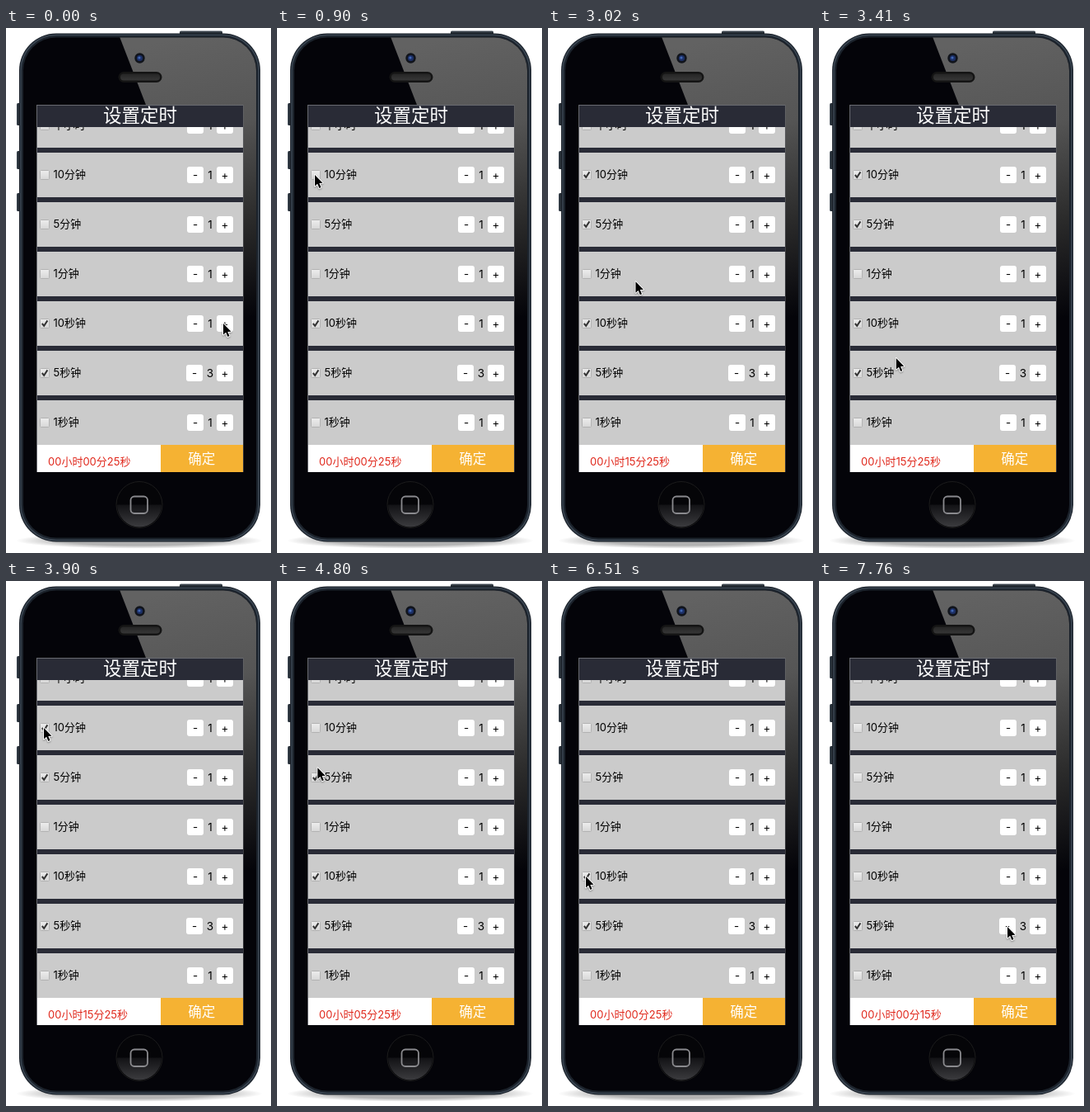
These frames come from a looping animation (322x636 px, 8000 ms). An HTML page with a canvas:

```html
<!DOCTYPE html>
<html lang="zh-CN">
<head>
<meta charset="utf-8">
<title>设置定时</title>
<style>
html, body { margin: 0; width: 100%; height: 100%; overflow: hidden; background: #fff; }
canvas { display: block; width: 322px; height: 636px; }
</style>
</head>
<body>
<canvas id="stage"></canvas>
<script>
const W = 322, H = 636, LOOP = 8000;
const FONT = 'Inter, "Noto Sans CJK SC", "Noto Sans CJK", sans-serif';
const canvas = document.getElementById('stage');
const ctx = canvas.getContext('2d');
const dpr = window.devicePixelRatio || 1;
canvas.width = W * dpr;
canvas.height = H * dpr;

// A row adds count times its seconds to the total while it is ticked.
const row = (label, seconds, from = 0, to = 0, count = 1) => ({
  label, count, seconds, on: t => t >= from && t < to
});
const rows = [
  row('半小时', 1800),
  row('10分钟', 600, 1630, 4350),
  row('5分钟', 300, 2660, 5180),
  row('1分钟', 60),
  row('10秒钟', 10, 0, 6980),
  row('5秒钟', 5, 0, LOOP, 3),
  row('1秒钟', 1)
];

const rowY = i => 118 + 60 * i;
const box = i => [46, rowY(i) - 1];

// Mouse moves: each bends from the last stop towards "via" and ends at "to".
const home = [264, 357];
const moves = [
  { from: 0, until: 470, via: [150, 452], to: [31, 211] },
  { from: 600, until: 900, via: [14, 200], to: box(1) },
  { from: 1930, until: 2360, via: [50, 226], to: box(2) },
  { from: 2900, until: 3200, via: [130, 330], to: [225, 453] },
  { from: 3200, until: 3710, via: [-12, 416], to: [72, 183] },
  { from: 3710, until: 3900, via: [55, 159], to: box(1) },
  { from: 4470, until: 4940, via: [56, 210], to: box(2) },
  { from: 5320, until: 5830, via: [40, 379], to: box(4) },
  { from: 6210, until: 6510, via: [40, 394], to: box(4) },
  { from: 7190, until: 7400, via: [130, 420], to: [220, 428] },
  { from: 7520, until: 7760, via: [224, 421], to: [229, 418] }
];

const ease = u => u * u * (3 - 2 * u);

function mouseAt(t) {
  let at = home;
  for (const { from, until, via, to } of moves) {
    if (t < from) break;
    const u = ease(Math.min(1, (t - from) / (until - from))), v = 1 - u;
    at = at.map((a, k) => v * v * a + 2 * u * v * via[k] + u * u * to[k]);
  }
  return at;
}

function totalAt(t) {
  const sum = rows.reduce((s, r) => s + (r.on(t) ? r.seconds * r.count : 0), 0);
  const two = n => String(Math.floor(n)).padStart(2, '0');
  return `${two(sum / 3600)}小时${two(sum / 60 % 60)}分${two(sum % 60)}秒`;
}

function rect(x, y, w, h, color) {
  ctx.fillStyle = color;
  ctx.fillRect(x, y, w, h);
}

function paint(fill, stroke, line = 1) {
  if (fill) { ctx.fillStyle = fill; ctx.fill(); }
  if (stroke) { ctx.strokeStyle = stroke; ctx.lineWidth = line; ctx.stroke(); }
}

function round(x, y, w, h, r, ...style) {
  ctx.beginPath();
  ctx.roundRect(x, y, w, h, r);
  paint(...style);
}

function disc(x, y, r, ...style) {
  ctx.beginPath();
  ctx.arc(x, y, r, 0, Math.PI * 2);
  paint(...style);
}

function path(points, close) {
  ctx.beginPath();
  points.forEach(([x, y]) => ctx.lineTo(x, y));
  if (close) ctx.closePath();
}

function text(str, x, y, size, color, align = 'left', weight = 400) {
  ctx.font = `${weight} ${size}px ${FONT}`;
  ctx.textAlign = align;
  ctx.fillStyle = color;
  ctx.fillText(str, x, y);
}

function fade(x0, y0, x1, y1, ...colors) {
  const g = ctx.createLinearGradient(x0, y0, x1, y1);
  colors.forEach((c, i) => g.addColorStop(i / (colors.length - 1), c));
  return g;
}

// The body outline, shrunk by d on every side
function body(d, ...style) {
  round(16 + d, 6.5 + d, 293 - 2 * d, 616 - 2 * d, 45 - d, ...style);
}

function drawShadow() {
  ctx.save();
  ctx.translate(162, 621);
  ctx.scale(1, 0.065);
  const shade = ctx.createRadialGradient(0, 0, 90, 0, 0, 150);
  shade.addColorStop(0, 'rgba(0,0,0,.3)');
  shade.addColorStop(1, 'rgba(0,0,0,0)');
  disc(0, 0, 150, shade);
  ctx.restore();
}

function drawPhone() {
  drawShadow();
  for (const [y, h] of [[91, 27], [149, 22], [200, 22]])
    round(13, y, 6, h, 1.5, fade(13, 0, 18, 0, '#39434d', '#10151b'));
  round(211, 3.5, 52, 5, 1.5, fade(0, 3, 0, 8, '#4a545e', '#10151b'));

  body(0, '#1b222b');
  body(2, null, '#3a4551', 1.6);
  body(5, '#040409');
  ctx.save();
  body(5);
  ctx.clip();
  path([[137, 8], [310, 8], [310, 454]], true);
  paint(fade(225, 8, 300, 350, '#626262', '#555', '#2b2b2b', '#040409'));
  ctx.restore();

  // Camera and speaker
  disc(162.5, 36.5, 6.2, '#11141b');
  disc(162.5, 36.5, 3.6, '#1c2f66');
  disc(162, 36, 1.6, '#4067b4');
  round(136.5, 53, 53, 13, 6.5, '#141414');
  round(139, 55.5, 48, 8, 4, fade(0, 55, 0, 64, '#242424', '#383838'));

  // Home button with a lit lower half
  disc(162, 577.5, 28, '#050508', '#1c1c1c');
  ctx.beginPath();
  ctx.arc(162, 577.5, 27, 0, Math.PI);
  paint(fade(0, 577, 0, 605, '#111114', '#3c3c3f'));
  round(151.5, 567.5, 20.5, 20.5, 4.5, null, '#8a8a8e', 1.8);
}

function drawBox(y, on) {
  round(41.5, y - 5.5, 11, 11, 1, fade(0, y - 5, 0, y + 6, '#ececec', '#d6d6d6'), '#b2b2b2');
  if (!on) return;
  path([[43.8, y], [46.2, y + 2.8], [50.4, y - 3.6]]);
  paint(null, '#333', 2);
}

function drawRow(row, i, t) {
  const y = rowY(i);
  rect(38, y - 27, 250, 54, '#cbcbcb');
  drawBox(y, row.on(t));
  text(row.label, 57.5, y + 4, 13, '#000');
  // A wider count pushes the minus button left.
  for (const [x, sign] of [[row.count > 1 ? 219 : 220, '-'], [256, '+']]) {
    round(x, y - 10, 20, 20, 3, '#fff');
    text(sign, x + 10, y + 4.5, 13.3, '#000', 'center');
  }
  text(row.count, 248, y + 4.6, 13.5, '#000', 'center');
}

function drawScreen(t) {
  rect(37, 93, 251.5, 445, '#686a70');
  rect(38, 94, 250, 444, '#292b36');
  ctx.save();
  ctx.beginPath();
  ctx.rect(38, 120, 250, 385);
  ctx.clip();
  rows.forEach((row, i) => drawRow(row, i, t));
  ctx.restore();
  text('设置定时', 163, 114.4, 22.5, '#fff', 'center', 300);
  rect(38, 505, 150, 33, '#fff');
  rect(188, 505, 100, 33, '#f5b233');
  text(totalAt(t), 51, 529.5, 13, '#e0281c');
  text('确定', 237.7, 527.5, 16.5, '#fff', 'center');
}

function drawMouse([x, y]) {
  ctx.save();
  ctx.translate(x - 0.5, y + 0.5);
  path([[0.5, 0.5], [0.5, 14], [3.7, 11.2], [5.9, 16.5], [8, 15.6], [5.8, 10.4], [10, 10.2]], true);
  ctx.lineJoin = 'round';
  ctx.shadowColor = 'rgba(0,0,0,.35)';
  ctx.shadowBlur = 2 * dpr;
  ctx.shadowOffsetY = dpr;
  paint(null, '#fff', 2);
  ctx.shadowColor = 'transparent';
  paint('#000');
  ctx.restore();
}

function draw(now) {
  const t = now % LOOP;
  ctx.setTransform(dpr, 0, 0, dpr, 0, 0);
  rect(0, 0, W, H, '#fff');
  drawPhone();
  drawScreen(t);
  drawMouse(mouseAt(t));
}

let start;
function tick(now) {
  start ??= now;
  draw(now - start);
  requestAnimationFrame(tick);
}
draw(0);
requestAnimationFrame(tick);
</script>
</body>
</html>
```
